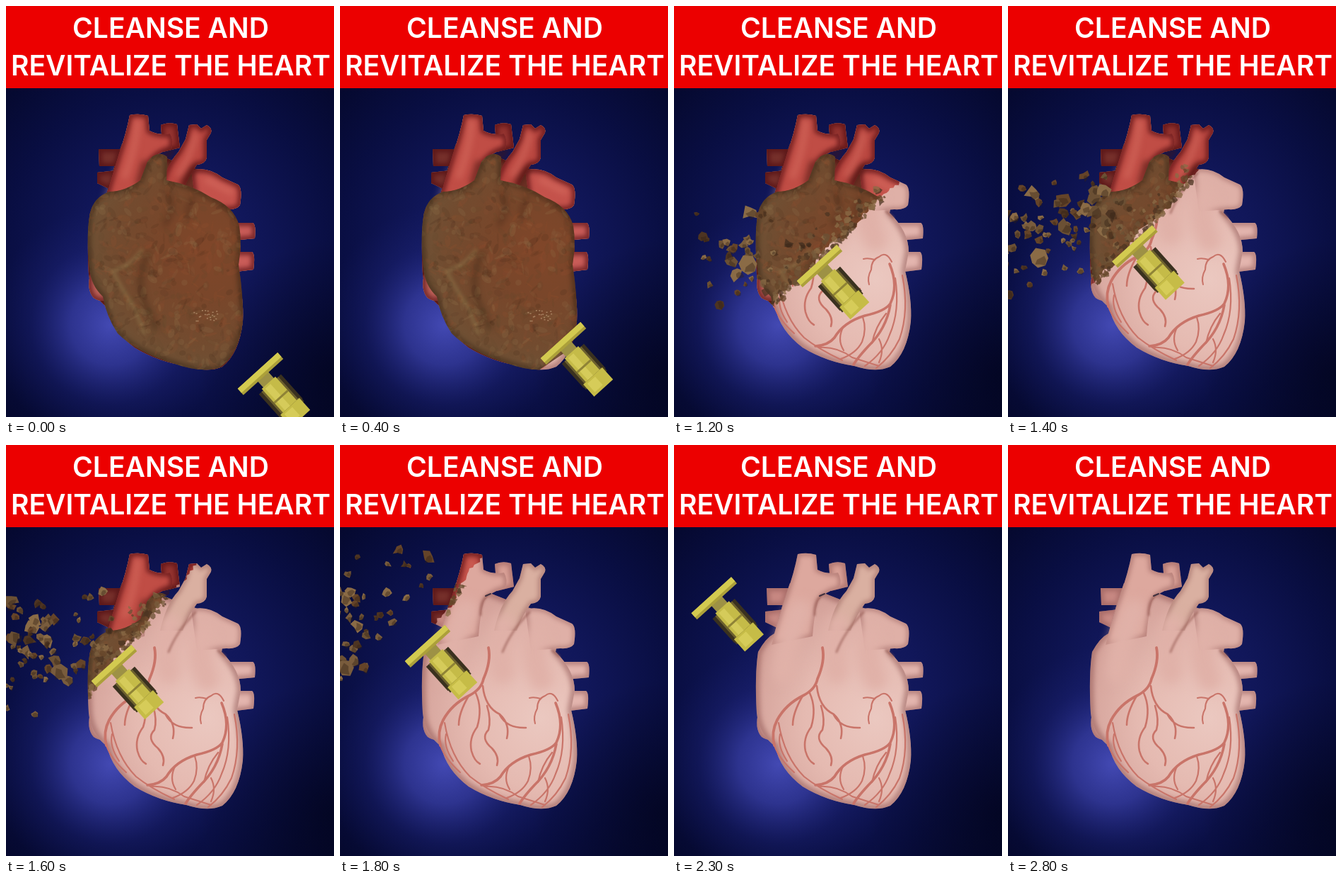
An HTML page with a canvas for the animation above (3000 ms loop, 464x580 px).

```html
<!DOCTYPE html>
<html lang="en">
<head>
<meta charset="utf-8">
<title>Heart</title>
<style>
html, body { margin: 0; width: 464px; height: 580px; overflow: hidden; background: #050830; }
canvas { position: absolute; left: 0; top: 0; }
h1 {
  position: absolute; left: 0; top: 0; width: 464px; height: 116px; margin: 0;
  box-sizing: border-box; padding: 4px 0 0; overflow: hidden;
  background: #ec0000; color: #fff; white-space: nowrap;
  font: 600 39.1px/53px Inter, Roboto, sans-serif; text-align: center;
}
h1 span { display: block; position: relative; left: 1px; }
</style>
</head>
<body>
<canvas id="stage" width="464" height="580"></canvas>
<h1><span>CLEANSE AND</span> <span>REVITALIZE THE HEART</span></h1>
<script>
const W = 464, H = 580, LOOP = 3000, STEP = 100, LAST = 2800;
const start = performance.now();
const ctx = document.getElementById('stage').getContext('2d');

function seeded(seed) {
  return () => {
    seed = (seed + 0x6D2B79F5) | 0;
    let v = Math.imul(seed ^ (seed >>> 15), 1 | seed);
    v = (v + Math.imul(v ^ (v >>> 7), 61 | v)) ^ v;
    return ((v ^ (v >>> 14)) >>> 0) / 4294967296;
  };
}

function canvas(draw) {
  const c = document.createElement('canvas');
  c.width = W;
  c.height = H;
  draw(c.getContext('2d'));
  return c;
}

// A prerendered picture with slightly soft edges.
function layer(draw) {
  const sharp = canvas(draw);
  return canvas(c => {
    c.filter = 'blur(0.7px)';
    c.drawImage(sharp, 0, 0);
  });
}

function radial(c, x, y, r, ...stops) {
  const g = c.createRadialGradient(x, y, 0, x, y, r);
  stops.forEach((s, i) => g.addColorStop(i / (stops.length - 1), s));
  return g;
}

// Fill a shape and darken the inside of its rim.
function solid(c, d, fill, rim, width = 9) {
  const p = new Path2D(d);
  c.save();
  c.fillStyle = fill;
  c.fill(p);
  c.clip(p);
  c.filter = 'blur(3px)';
  c.strokeStyle = rim;
  c.lineWidth = width;
  c.stroke(p);
  c.restore();
}

function strokes(c, d, color, width, blur = 0) {
  c.save();
  if (blur) c.filter = `blur(${blur}px)`;
  c.strokeStyle = color;
  c.lineWidth = width;
  c.lineCap = c.lineJoin = 'round';
  c.stroke(new Path2D(d));
  c.restore();
}

const LEFT_VEINS = 'M131 202H162L156 226H132ZM129 235L156 232L150 260L129 250Z';
const RIGHT_VEINS = 'M300 296Q306 305 314 306H349Q354 308 352 328L310 332ZM314 347H348Q353 350 350 372L318 376Z';
const AURICLE = 'M262 232Q285 226 306 242L328 252Q335 257 331 281Q326 288 312 287L270 290Z';
const TWIN = 'M259 168L270 167L276 173L284 168Q292 172 290 179L284 189V214Q282 223 270 224Q258 240 250 262L218 262Q226 225 244 206L254 188Z';
const STUB = 'M219 168Q230 163 242 167L246 200L222 206Z';
const AORTA = 'M175 154Q188 151 201 155L203 176Q216 183 232 180Q238 190 234 202Q214 206 204 220Q198 240 196 270L138 282Q150 240 160 208Q170 180 175 154Z';
const ATRIUM = 'M120 375Q113 400 124 412Q136 420 146 412L150 370Z';
const BODY = 'M119 292Q130 272 142 266Q153 225 164 195L202 205L240 220Q262 226 290 240Q312 262 305 292Q332 318 332 347L327 374Q337 415 335 445Q330 490 306 509Q286 518 255 508Q215 502 182 482Q150 458 143 425Q120 408 117 378Q114 325 119 292Z';
const CRUST = 'M119 292Q124 270 146 262Q168 262 190 246L200 220Q214 202 228 213L227 246Q262 252 290 270Q322 282 330 310Q334 335 329 365Q336 410 335 446Q328 496 300 511Q274 518 236 504Q184 488 158 462Q142 438 137 410Q120 394 118 370Q113 320 119 292Z';

const sky = canvas(c => {
  c.fillStyle = radial(c, 230, 345, 350, '#171d66', '#11175a', '#090e42', '#040729');
  c.fillRect(0, 0, W, H);
  c.fillStyle = radial(c, 148, 450, 170, 'rgba(70,76,184,.95)', 'rgba(56,62,164,.75)', 'rgba(34,40,128,.3)', 'rgba(26,32,110,0)');
  c.fillRect(0, 0, W, H);
  c.fillStyle = radial(c, 464, 520, 190, 'rgba(2,4,28,.7)', 'rgba(2,4,28,0)');
  c.fillRect(0, 0, W, H);
});

const clean = layer(c => {
  const rim = 'rgba(140,82,80,.5)';
  solid(c, LEFT_VEINS, '#c88983', rim);
  solid(c, RIGHT_VEINS, '#e3b5ae', rim);
  solid(c, ATRIUM, '#cf9b95', rim);
  solid(c, STUB, '#d9a096', rim);
  solid(c, BODY, radial(c, 285, 385, 200, '#ebc8c0', '#e5bab1', '#d09c94'), rim, 11);
  solid(c, AURICLE, '#dfb0a7', rim, 6);
  solid(c, TWIN, '#dab0a1', rim, 7);
  solid(c, AORTA, '#dda89e', rim, 7);
  // Blend the trunks into the body.
  strokes(c, 'M178 235Q160 270 155 320M232 255Q222 290 230 320M278 270Q268 300 285 330', '#e0b1a8', 34, 8);
  strokes(c, 'M268 236Q242 262 230 292M300 290L310 298M209 212Q198 222 199 240', 'rgba(145,85,78,.6)', 3, 1.5);
  strokes(c, 'M206 213L213 210', '#40313f', 2);
  const red = '#c97469';
  strokes(c, 'M210 286Q214 305 203 330Q200 345 182 354Q158 366 146 388Q137 405 142 424', red, 3.8);
  strokes(c, 'M202 340Q205 370 226 380Q241 394 236 414M192 350Q202 372 194 398Q182 414 186 432Q190 446 198 450M208 368Q214 388 210 402Q198 414 215 428Q226 440 222 452M226 381Q236 400 263 399M182 354Q168 378 168 395', red, 2.6);
  strokes(c, 'M308 361Q300 345 290 354Q279 358 279 372Q273 383 276 393M284 358Q274 355 268 357', red, 2.1);
  strokes(c, 'M305 364Q318 395 306 420Q298 431 270 437Q240 446 227 468Q218 479 200 480M306 422Q300 456 275 480Q260 496 254 506', red, 3.6);
  strokes(c, 'M313 384Q320 430 305 464Q296 490 270 508M267 439Q273 456 266 474Q258 490 236 498M323 380Q333 430 319 470Q307 495 286 511M300 434Q285 452 280 476M240 452Q230 470 240 486M290 470Q298 485 290 503', red, 2.2);
  strokes(c, 'M142 424Q148 442 170 462M148 392Q156 440 184 468Q204 484 238 500M150 408Q146 425 160 446M205 482Q230 480 252 496L290 508', red, 2.1);
});

const dirty = layer(c => {
  const rim = 'rgba(80,12,16,.65)';
  solid(c, BODY, '#6b3024', rim);
  solid(c, LEFT_VEINS, '#76302b', rim);
  solid(c, RIGHT_VEINS, '#c95c58', rim);
  solid(c, ATRIUM, '#bd6058', rim);
  solid(c, STUB, '#94332f', rim);
  solid(c, AURICLE, '#c4524b', rim);
  solid(c, TWIN, '#ba4740', rim);
  solid(c, AORTA, '#c04d45', rim);
  strokes(c, 'M186 164Q184 200 168 240M268 182Q262 212 244 238M285 246L318 262', 'rgba(226,122,108,.4)', 9, 4);
  strokes(c, 'M196 222L188 250M222 216L234 205M250 250L266 228', 'rgba(70,20,15,.6)', 9, 4);
  const rnd = seeded(7);
  solid(c, CRUST, radial(c, 285, 345, 200, '#804629', '#79462a', '#724b2f', '#6c563a'), 'rgba(50,32,18,.5)', 9);
  c.save();
  c.clip(new Path2D(CRUST));
  const tones = ['#967a50', '#432818', '#98502f', '#5e472c'];
  for (let i = 0; i < 900; i++) {
    c.globalAlpha = 0.08 + rnd() * 0.13;
    c.fillStyle = tones[i % 4];
    c.beginPath();
    c.ellipse(112 + rnd() * 226, 205 + rnd() * 312, 2 + rnd() * 8, 1 + rnd() * 4, rnd() * 3, 0, 7);
    c.fill();
  }
  c.globalAlpha = 1;
  strokes(c, 'M192 345Q178 365 151 374Q164 400 183 428L195 462', 'rgba(154,135,86,.4)', 5, 2.5);
  strokes(c, 'M202 350Q182 380 196 420L212 452', 'rgba(48,30,16,.35)', 8, 4);
  strokes(c, 'M228 262Q242 285 225 308M265 270Q255 285 258 300', 'rgba(45,25,15,.3)', 7, 4);
  c.fillStyle = '#a98362';
  for (let i = 0; i < 22; i++) c.fillRect(264 + rnd() * 38, 429 + rnd() * 15, 2, 1.5);
  c.restore();
});

// time, bar x, bar y, wipe angle, edge offset
const KEYS = [
  [0, 360, 519, 56, 20], [400, 316, 476, 56, 12], [800, 265, 427, 56, -15],
  [1200, 206, 367, 45.5, -8], [1600, 153, 312, 40, -5],
  [2000, 95, 256, 29, -12], [2400, 44, 203, 22, -12]
];

function pose(t) {
  let i = 0;
  while (i < KEYS.length - 2 && t > KEYS[i + 1][0]) i++;
  const a = KEYS[i], b = KEYS[i + 1], f = Math.min(1, (t - a[0]) / (b[0] - a[0]));
  const [, x, y, deg, off] = a.map((v, k) => v + (b[k] - v) * f);
  return { x, y, ang: deg * Math.PI / 180, off };
}

// Stage position: d along the wipe direction, u along the wiped edge.
function beside(m, d, u) {
  const cos = Math.cos(m.ang), sin = Math.sin(m.ang);
  return [m.x + cos * d - sin * u, m.y + sin * d + cos * u];
}

const BROWN = ['#6b5034', '#8a6b46', '#4d3422', '#654429', '#795c3d'];

function chunk(x, y, r, turn, color, rnd) {
  ctx.fillStyle = color;
  ctx.beginPath();
  for (let k = 0; k < 7; k++) {
    const a = turn + k * Math.PI / 3.5, q = r * (0.45 + rnd() * 0.8);
    ctx.lineTo(x + Math.cos(a) * q, y + Math.sin(a) * q);
  }
  ctx.fill();
}

function drawCrust(t, m) {
  const rnd = seeded(300 + t);
  ctx.save();
  ctx.translate(m.x, m.y);
  ctx.rotate(m.ang);
  ctx.beginPath();
  ctx.moveTo(-500, -300);
  for (let y = -300; y <= 300; y += 4) {
    ctx.lineTo(m.off + (t < 500 ? 0 : rnd() * 6 - 3 + 3 * Math.sin(y / 15)), y);
  }
  ctx.lineTo(-500, 300);
  ctx.clip();
  ctx.rotate(-m.ang);
  ctx.translate(-m.x, -m.y);
  ctx.drawImage(dirty, 0, 0);
  ctx.restore();
  if (t < 700) return;
  // Loose crumbs along the wiped edge.
  ctx.save();
  ctx.clip(new Path2D(BODY));
  ctx.globalAlpha = 0.75;
  for (let i = 0; i < 170; i++) {
    const [x, y] = beside(m, m.off + 4 - rnd() * rnd() * 42, rnd() * 270 - 135);
    chunk(x, y, 2 + rnd() * 4, rnd() * 6, BROWN[i % 5], rnd);
  }
  ctx.restore();
}

const rnd = seeded(42);
const debris = Array.from({ length: 130 }, (_, i) => {
  const late = rnd(), born = 850 + late * 850, m = pose(born);
  const [x, y] = beside(m, -15 - rnd() * 90, 95 - late * 60 - rnd() * (75 + late * 70));
  return {
    born, x, y, seed: i + 1, color: BROWN[i % 5],
    vx: -0.28 - rnd() * 0.3, vy: 0.05 - rnd() * 0.36,
    r: 4 + rnd() * rnd() * 10, spin: rnd() * 0.012 - 0.006
  };
});

function drawDebris(t) {
  for (const d of debris) {
    const age = t - d.born;
    if (age < 0 || age > 600) continue;
    const x = d.x + d.vx * age, y = d.y + d.vy * age, turn = d.spin * age + d.seed;
    chunk(x, y, d.r, turn, d.color, seeded(d.seed));
    chunk(x + d.r * 0.2, y + d.r * 0.25, d.r * 0.65, turn, 'rgba(50,32,20,.4)', seeded(d.seed + 500));
  }
}

function box(color, x, y, w, h) {
  ctx.fillStyle = color;
  ctx.fillRect(x, y, w, h);
}

function drawTool(m) {
  ctx.save();
  ctx.translate(m.x, m.y);
  ctx.rotate(-42 * Math.PI / 180);
  box('#9d9145', -10, 5, 20, 16);
  box('#3a311f', -21, 20, 42, 46);
  box('#6c602e', -16, 20, 32, 50);
  box('#c5bb48', -13, 17, 26, 52);
  box('#d5cb5a', -9, 20, 10, 42);
  box('#8f8336', -13, 42, 26, 3);
  box('#453c20', -20, 62, 40, 8);
  box('#c6bc47', -18, 62, 36, 23);
  box('#d6cc59', -13, 65, 15, 16);
  box('#aca03a', -38, -6, 76, 12);
  box('#d3ca50', -38, -6, 76, 8);
  ctx.restore();
}

function draw(t) {
  const m = pose(t);
  ctx.drawImage(sky, 0, 0);
  ctx.drawImage(clean, 0, 0);
  if (t < 2000) drawCrust(t, m);
  drawDebris(t);
  if (t <= 2400) drawTool(m);
}

let shown = -1;
function tick() {
  const t = Math.min(LAST, Math.floor((performance.now() - start) % LOOP / STEP) * STEP);
  if (t !== shown) draw(shown = t);
  requestAnimationFrame(tick);
}
tick();
</script>
</body>
</html>
```
